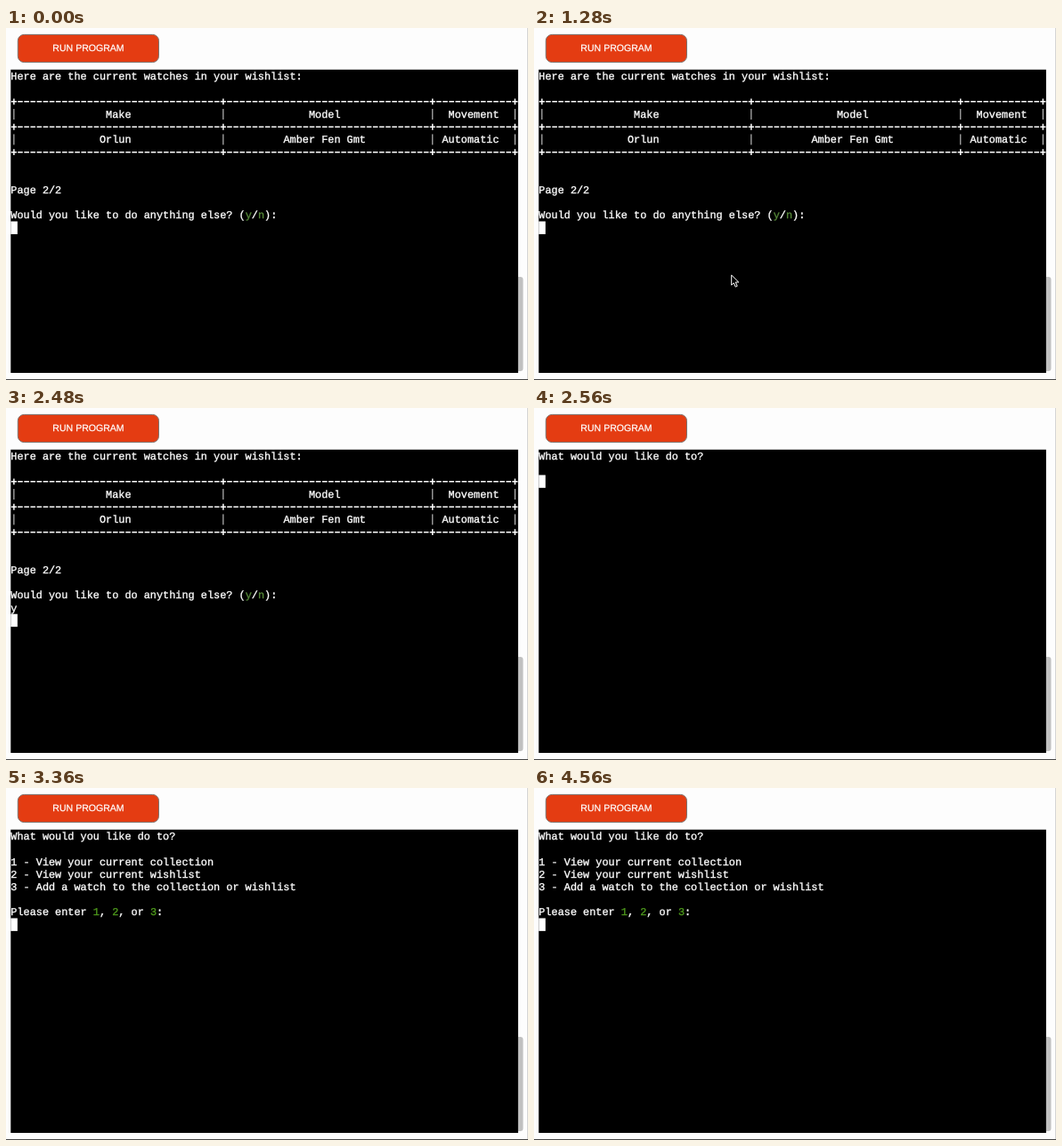
An HTML page that plays this animation: 586 by 396 pixels, repeating every 4.96 s.

```html
<!DOCTYPE html>
<html lang="en">
<head>
<meta charset="utf-8">
<title>Wishlist terminal</title>
<style>
html, body { margin: 0; width: 100%; height: 100%; overflow: hidden; background: #fdfdfd; }
svg { display: block; }
text { fill: #fff; white-space: pre; text-rendering: geometricPrecision; }
.term text { font: 11.87px "Liberation Mono", "Courier New", monospace; stroke-width: 0.35; }
.label { font: 10.55px "Liberation Sans", Arial, sans-serif; text-anchor: middle; stroke: #fff; stroke-width: 0.25; }
</style>
</head>
<body>
<svg id="stage" width="586" height="396" viewBox="0 0 586 396">
  <rect width="586" height="396" fill="#fdfdfd"/>
  <rect x="585" width="1" height="396" fill="#d4d4d4"/>
  <rect y="395" width="586" height="1" fill="#444"/>
  <rect x="13.3" y="7.4" width="158.2" height="31.2" rx="7" fill="#e43c12" stroke="#7c7470"/>
  <text class="label" x="92.5" y="26.2">RUN PROGRAM</text>
  <path d="M575 280h2.5a3 3 0 0 1 3 3v100a3 3 0 0 1-3 3H575z" fill="#c1c1c1"/>
  <rect x="5.3" y="46.8" width="569.6" height="341.2" fill="#000"/>
  <g class="term">
    <g id="list"></g>
    <g id="menu"></g>
    <rect id="caret" fill="#fff"/>
  </g>
  <path id="pointer" d="M0 0V11.2L2.6 8.8 4.5 13.2 6.5 12.3 4.6 8H8.1Z" fill="#000" stroke="#fff" stroke-linejoin="round"/>
</svg>
<script>
const LOOP = 4960, TICK = 80;
const CELL = 7.12, ROW = 14.21, LEFT = 5.3, TOP = 47;
const GREEN = "#4e9a1c", DIM = "#578a3a";
const ENTER = 2480, CLEAR = 2560, TYPE = 1440;
const $ = id => document.getElementById(id);
const colX = c => LEFT + c * CELL;
const rowY = r => TOP + r * ROW;

function add(parent, tag, attrs) {
  const el = document.createElementNS("http://www.w3.org/2000/svg", tag);
  for (const k in attrs) el.setAttribute(k, attrs[k]);
  return parent.appendChild(el);
}

function write(parent, col, row, str, color = "#fff") {
  const style = `fill:${color};stroke:${color}`;
  const el = add(parent, "text", { x: colX(col), y: rowY(row) + 11.1, style });
  el.textContent = str;
  return el;
}

// Consecutive pieces of one line, each with its own colour.
function writeLine(parent, row, pieces) {
  let col = 0;
  for (const [str, color] of pieces) {
    write(parent, col, row, str, color);
    col += str.length;
  }
}

const list = $("list"), menu = $("menu");
const edges = [0, 33, 66, 79];

function tableRule(row) {
  const y = rowY(row) + 7.4;
  let d = "";
  for (let c = 0; c < 80; c++) {
    const x = colX(c);
    d += edges.includes(c)
      ? `M${x + 0.5} ${y}h6.2M${x + 3.6} ${y - 3.4}v6.8`
      : `M${x + 0.8} ${y}h5.6`;
  }
  add(list, "path", { d, stroke: "#fff", "stroke-width": 1.5, fill: "none" });
}

function tableRow(row, cells) {
  const d = edges.map(c => `M${colX(c) + 3.6} ${rowY(row) + 1.4}v12`).join("");
  add(list, "path", { d, stroke: "#ddd", "stroke-width": 1 });
  cells.forEach((str, i) => {
    const room = edges[i + 1] - edges[i] - 1;
    write(list, edges[i] + 1 + Math.floor((room - str.length) / 2), row, str);
  });
}

write(list, 0, 0, "Here are the current watches in your wishlist:");
[2, 4, 6].forEach(tableRule);
tableRow(3, ["Make", "Model", "Movement"]);
tableRow(5, ["Orlun", "Amber Fen Gmt", "Automatic"]);
write(list, 0, 9, "Page 2/2");
writeLine(list, 11, [["Would you like to do anything else? ("], ["y", DIM], ["/"], ["n", DIM], ["):"]]);
const answer = write(list, 0, 12, "y");

// Menu lines with the time each is printed.
const menuLines = [
  [CLEAR, 0, [["What would you like do to?"]]],
  [2720, 2, [["1 - View your current collection"]]],
  [2880, 3, [["2 - View your current wishlist"]]],
  [3120, 4, [["3 - Add a watch to the collection or wishlist"]]],
  [3280, 6, [["Please enter "], ["1", GREEN], [", "], ["2", GREEN], [", or "], ["3", GREEN], [":"]]]
].map(([at, row, pieces]) => {
  const g = add(menu, "g", {});
  writeLine(g, row, pieces);
  return { at, g };
});

// Caret stops: time, column, row.
const caretStops = [
  [0, 0, 12], [TYPE, 1, 12], [ENTER, 0, 13], [CLEAR, 0, 2],
  [2720, 0, 3], [2880, 0, 4], [3120, 0, 6], [3280, 0, 7]
];

const show = (el, on) => el.setAttribute("visibility", on ? "visible" : "hidden");

function draw(time) {
  const t = Math.floor(time % LOOP / TICK) * TICK;
  list.style.display = t < CLEAR ? "" : "none";
  show(answer, t >= TYPE);
  for (const { at, g } of menuLines) show(g, t >= at);

  const [, col, row] = caretStops.filter(s => s[0] <= t).pop();
  const caret = $("caret");
  caret.setAttribute("x", colX(col));
  caret.setAttribute("y", rowY(row));
  caret.setAttribute("width", 7.6);
  caret.setAttribute("height", 14.4);

  // The pointer slides in from below, rests, and hides on typing.
  const p = Math.min(1, Math.max(0, (t - 80) / 400));
  const left = (1 - p) ** 2;
  const x = 221.7 + 38 * left, y = 278 + 110 * left;
  $("pointer").setAttribute("transform", `translate(${x} ${y})`);
  show($("pointer"), t >= 80 && t < TYPE);
}

const start = performance.now();
function frame() {
  draw(performance.now() - start);
  requestAnimationFrame(frame);
}
frame();
</script>
</body>
</html>
```
